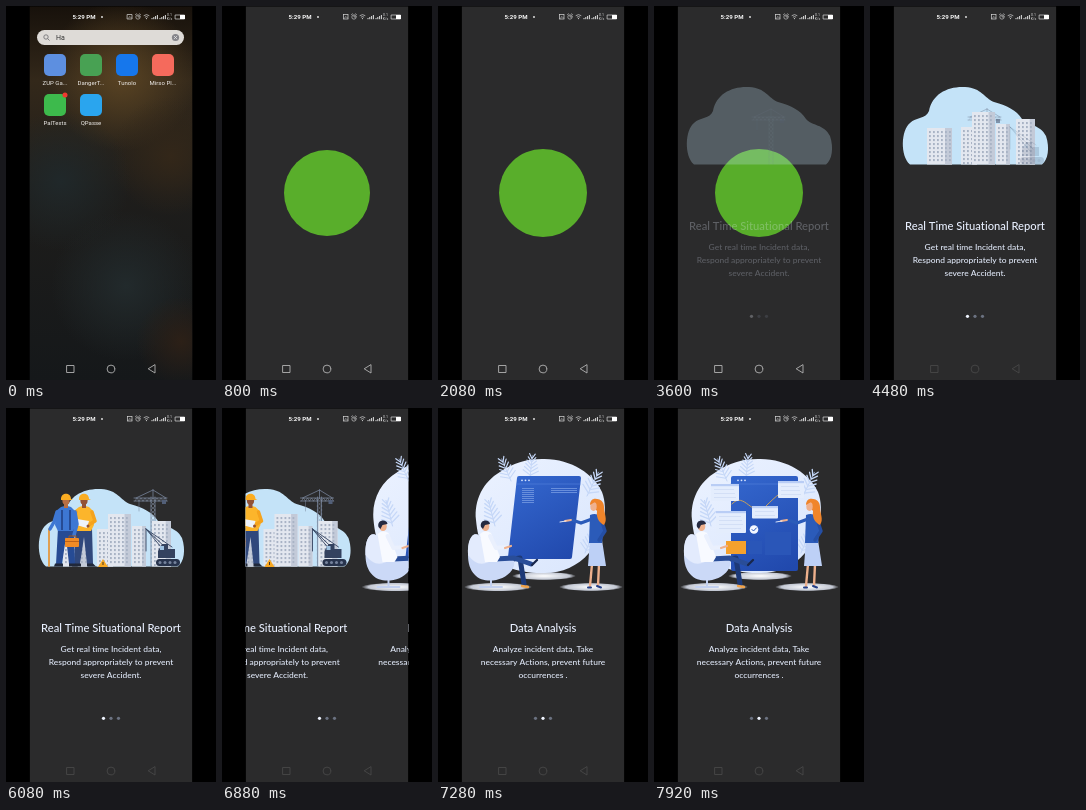
Write an HTML page with a canvas that moves like this. It is 210 px wide and 374 px high and loops after 8000 ms.

```html
<!DOCTYPE html>
<html lang="en">
<head>
<meta charset="utf-8">
<title>App onboarding</title>
<style>
html, body { margin: 0; width: 100%; height: 100%; overflow: hidden; background: #000; }
canvas { display: block; width: 210px; height: 374px; }
</style>
</head>
<body>
<canvas id="stage"></canvas>
<script>
const W = 210, H = 374, LOOP = 8000;
const LEFT = 23.5, WIDTH = 163, DARK = '#2b2b2c';
const canvas = document.getElementById('stage');
const c = canvas.getContext('2d');
const ratio = window.devicePixelRatio || 1;
canvas.width = W * ratio;
canvas.height = H * ratio;
c.letterSpacing = '0.01px'; // keeps letter pairs unjoined

const clamp = v => Math.max(0, Math.min(1, v));
const ramp = (t, a, b) => clamp((t - a) / (b - a));
const smooth = v => v * v * (3 - 2 * v);
const easeOut = v => 1 - Math.pow(1 - v, 3);
const mix = (a, b, v) => a + (b - a) * v;

// Eased value through [time, value] pairs
function track(t, ...keys) {
  if (t <= keys[0][0]) return keys[0][1];
  for (let i = 1; i < keys.length; i++) {
    const [t0, v0] = keys[i - 1], [t1, v1] = keys[i];
    if (t <= t1) return mix(v0, v1, smooth(ramp(t, t0, t1)));
  }
  return keys[keys.length - 1][1];
}

function rect(x, y, w, h, fill) { c.fillStyle = fill; c.fillRect(x, y, w, h); }
function round(x, y, w, h, r, fill) {
  c.beginPath(); c.roundRect(x, y, w, h, r); c.fillStyle = fill; c.fill();
}
function oval(x, y, rx, ry, fill, turn = 0) {
  c.beginPath(); c.ellipse(x, y, rx, ry, turn, 0, 7); c.fillStyle = fill; c.fill();
}
function shape(d, fill) { c.fillStyle = fill; c.fill(new Path2D(d)); }
function line(d, color, width = 1) {
  c.strokeStyle = color; c.lineWidth = width; c.lineCap = c.lineJoin = 'round';
  c.stroke(new Path2D(d));
}
function label(s, x, y, font, fill, align = 'center') {
  c.font = font; c.fillStyle = fill; c.textAlign = align; c.fillText(s, x, y);
}
function layer(alpha, draw, dx = 0, dy = 0) {
  if (alpha <= 0) return;
  c.save();
  c.globalAlpha *= alpha;
  c.translate(dx, dy);
  draw();
  c.restore();
}

function glow(x, y, r, color) {
  const g = c.createRadialGradient(x, y, 0, x, y, r);
  g.addColorStop(0, color + 'ff');
  g.addColorStop(1, color + '00');
  rect(LEFT, 0, WIDTH, H, g);
}

function drawer() {
  const g = c.createLinearGradient(0, 0, 0, H);
  g.addColorStop(0, '#17110b');
  g.addColorStop(.2, '#33281a');
  g.addColorStop(.5, '#1e1d1b');
  g.addColorStop(1, '#15181a');
  rect(LEFT, 0, WIDTH, H, g);
  glow(115, 70, 75, '#594323');
  glow(165, 150, 60, '#332719');
  glow(55, 175, 70, '#20282a');
  glow(120, 280, 75, '#222a2c');
  glow(175, 335, 45, '#2c2017');

  round(31, 24, 147, 15, 7.5, '#dedbd7');
  c.beginPath(); c.arc(40, 31, 2.2, 0, 7);
  c.strokeStyle = '#77777a'; c.lineWidth = .9; c.stroke();
  line('M41.7 32.7L43.3 34.3', '#77777a', .9);
  label('Ha', 50, 33.8, '7px Roboto, sans-serif', '#333', 'left');
  oval(169.5, 31.5, 3.6, 3.6, '#85858a');
  line('M168.2 30.2L170.8 32.8M170.8 30.2L168.2 32.8', '#eee', .7);

  const apps = [
    ['ZUP Ga...', '#5d8fe0'], ['DangerT...', '#48a153'], ['Tunolo', '#1677ec'],
    ['Mirso Pl...', '#f56a5c'], ['PalTexts', '#3dba4c'], ['QPasse', '#2aa5ee']
  ];
  apps.forEach(([name, color], i) => {
    const x = 49 + i % 4 * 36, y = 48 + Math.floor(i / 4) * 40;
    round(x - 11, y, 22, 22, 5, color);
    label(name, x, y + 30.5, '6px Roboto, sans-serif', '#f2f0ee');
  });
  oval(59, 89, 2.5, 2.5, '#f0392f');
}

function badge(t) {
  const r = mix(43, 44, smooth(ramp(t, 1360, 1600)));
  oval(105, 187, r, r, '#59ae2b');
}

function splash(t) {
  const p = easeOut(ramp(t, 480, 760));
  if (p <= 0) return;
  const x = mix(74, LEFT, p), y = mix(48, 0, p);
  const w = mix(22, WIDTH, p), h = mix(22, H, p), s = w / WIDTH;
  c.save();
  c.beginPath(); c.roundRect(x, y, w, h, 6 * (1 - p)); c.clip();
  rect(x, y, w, h, DARK);
  c.translate(x + w / 2, y + h / 2);
  c.scale(s, s);
  c.translate(-105, -187);
  layer(1 - ramp(t, 3600, 3840), () => badge(t));
  c.restore();
}

function copy(title, lines) {
  label(title, 105, 224, '500 11.2px Lato, sans-serif', '#e9f0ff');
  lines.forEach((s, i) =>
    label(s, 105, 244.3 + i * 12.6, '500 8.45px Lato, sans-serif', '#e2eafa'));
}

function tower(x, y, w, h) {
  rect(x, y, w, h, '#e3e7ef');
  rect(x + w * .72, y, w * .28, h, '#c3cad8');
  for (let a = x + 2; a < x + w - 2; a += 4)
    for (let b = y + 3; b < y + h - 2; b += 4) rect(a, b, 1.8, 2.1, '#a9b3c5');
}

function towerCrane() {
  line('M-2 78V7M2 78V7M-19 8H14M-19 11H14M0 0L-17 8M0 0L13 8M0 0V8', '#77839a', .8);
  let d = '';
  for (let y = 12; y < 76; y += 4) d += `M-2 ${y}L2 ${y + 4}M2 ${y}L-2 ${y + 4}`;
  for (let x = -18; x < 13; x += 4) d += `M${x} 11L${x + 2} 8L${x + 4} 11`;
  line(d, '#8b96aa', .5);
  line('M-14 11V21', '#77839a', .5);
  rect(9, 10, 4, 4, '#525f78');
}

function crawler() {
  line('M160 145L140 121M163 143L140 121M140 121V143M166 139L140 121', '#34425f', .9);
  shape('M152 143L156 136H162V141H169V150H152Z', '#34425f');
  rect(154, 138, 4, 4, '#9fc2e2');
  round(150, 151, 24, 7, 3.5, '#27334c');
  for (let x = 154; x < 172; x += 5) oval(x, 154.5, 1.5, 1.5, '#74829c');
}

function person(shirt, pants, skin) {
  shape('M-8 120H8L9 156H3L0 129L-4 156H-10Z', pants);
  shape('M-11 155.5H-3V158.5H-12ZM3 155.5H9L12 158.5H3Z', '#20283a');
  shape('M-5 99Q0 97 5 99L9 103L10 117L7 123H-8L-11 117L-10 103Z', shirt);
  rect(-2, 95, 4, 5, skin);
  oval(0, 92.5, 3.6, 4.4, skin);
  shape('M-5 91C-5 84 5 84 5 91L7 92H-5Z', '#fbad22');
}

function toolMan() {
  line('M-17 121V158', '#e69334', 1.7);
  person('#3d77d3', '#264b94', '#b96f44');
  rect(-5, 102, 2, 20, '#264b94');
  rect(3, 102, 2, 20, '#264b94');
  line('M-9 104L-12 114L-16 121', '#3d77d3', 3.5);
  line('M9 104L11 116L8 127', '#3d77d3', 3.5);
  line('M3 131V128H10V131', '#9b561c', 1);
  round(-1, 130, 14, 9, 1, '#f18b25');
  rect(-1, 133, 14, 1, '#bd6219');
}

function clipMan() {
  person('#fcb52b', '#30487c', '#925236');
  line('M-8 104L-11 114L-3 117', '#f5a31d', 3.5);
  line('M8 104L11 113L3 118', '#f5a31d', 3.5);
  shape('M-7 111L5 113L3 120L-8 117Z', '#eef3fb');
  oval(4, 118, 1.5, 1.5, '#925236');
}

function siteScene(t) {
  shape('M40 158.5C30 150 31 124 40 117C46 111 56 113 59 105C62 88 78 80 95 81' +
    'C112 82 114 92 124 96C138 100 146 104 152 113C158 120 170 118 176 130' +
    'C180 142 178 154 172 158.5Z', '#c4e3f8');
  const move = smooth(ramp(t, 5440, 6050));
  const grow = smooth(ramp(t, 3820, 4400));
  c.save();
  c.beginPath(); c.rect(LEFT, 70, WIDTH, 88.5); c.clip();
  layer(mix(.6, 1, move), towerCrane, mix(117, 147, move), mix(103, 82, move));
  if (grow > 0) {
    c.translate(0, 55 * (1 - grow));
    tower(57, 122, 25, 37);
    tower(91, 121, 16, 38);
    tower(102, 106, 23, 53);
    tower(126, 118, 14, 41);
    tower(146, 113, 19, 46);
  }
  c.restore();
  layer(ramp(t, 4400, 4880), crawler);
  layer(ramp(t, 5760, 6000), () => {
    shape('M97 151L102 159H92Z', '#f7a823');
    rect(96.5, 154, 1, 3, '#473620');
  });
  layer(t > 4480 ? 1 : 0, clipMan, track(t, [4480, 8], [5200, 95], [5440, 95], [6000, 78]));
  layer(t > 5120 ? 1 : 0, toolMan, track(t, [5120, 2], [5440, 28], [6000, 60]));
}

function leaf(x, y, turn, size) {
  c.save();
  c.translate(x, y); c.rotate(turn); c.scale(size, size);
  line('M0 0V-24', '#b3c9f2', .6);
  for (let i = 0; i < 6; i++) {
    const a = -3 - i * 3.5, w = 8 - i;
    line(`M0 ${a}L${-w} ${a - 5}M0 ${a}L${w} ${a - 5}`, '#c6d8f8', 1.2);
  }
  c.restore();
}

function shadow(x, y, rx) {
  c.save();
  c.translate(x, y); c.scale(1, .13);
  const g = c.createRadialGradient(0, 0, 0, 0, 0, rx);
  g.addColorStop(0, '#ffffff');
  g.addColorStop(.8, '#e9effdcc');
  g.addColorStop(1, '#e9effd00');
  oval(0, 0, rx, rx, g);
  c.restore();
}

function card(x, y, w, h) {
  round(x, y, w, h, 1, '#e4edfd');
  rect(x, y, w, 2.2, '#b9cdf5');
  for (let b = y + 5; b < y + h - 2; b += 4) rect(x + 3, b, w - 8 + b % 3, .8, '#d0ddf6');
}

function board(t) {
  const p = smooth(ramp(t, 7520, 7840));
  const skew = mix(9, 0, p);
  const l = mix(70, 77, p), r = mix(134, 144, p), b = mix(151, 163, p);
  const g = c.createLinearGradient(80, 66, 130, b);
  g.addColorStop(0, '#3467ce');
  g.addColorStop(1, '#2149ad');
  shape(`M${l + skew} 70Q${l + skew} 68 ${l + skew + 2} 68H${r + skew - 2}` +
    `Q${r + skew} 68 ${r + skew} 70L${r} ${b - 2}Q${r} ${b} ${r - 2} ${b}H${l + 2}` +
    `Q${l} ${b} ${l} ${b - 2}Z`, g);
  line(`M${l + skew} 76H${r + skew - 1}`, '#4f7cd8', .7);
  for (let i = 0; i < 3; i++) oval(84 + i * 3.5, 72.3, .9, .9, '#d6e4ff');
  layer(1 - p, () => {
    for (let y = 80; y < 96; y += 2) {
      rect(84, y, 12, .9, '#6f95df');
      if (y < 86) rect(113, y, 26, .9, '#6f95df');
    }
  });
  layer(p, () => {
    rect(72, 133, 20, 13, '#f5a12d');
    rect(94, 133, 14, 13, '#2a56b8');
    rect(111, 124, 26, 23, '#2a56b8');
    line('M78 96C90 82 99 111 111 99S128 83 140 78', '#d9a850', .9);
    const rise = 5 * (1 - p);
    card(57, 76 + rise, 28, 17);
    card(62, 103 + rise, 30, 22);
    card(98, 98 + rise, 26, 12.5);
    card(124, 73 + rise, 26, 17);
    oval(100, 121.5, 4.3, 4.3, '#f3f7ff');
    line('M98 121.5L99.5 123L102.3 120', '#2856b9', 1);
  });
}

function sittingMan() {
  line('M53 170V178M42 179H64', '#c2d0f0', 2);
  line('M62 153L82 150L86 176', '#1d3977', 5);
  shape('M30 147C29 126 39 121 44 132C48 144 54 149 66 149C78 149 78 156 74 162' +
    'C66 174 45 176 37 167C32 162 30 155 30 147Z', '#cbd9f7');
  shape('M30 147C29 126 39 121 44 132C47 142 51 148 57 150C47 158 38 158 30 147Z', '#e3ebfd');
  line('M57 151L76 150L93 156', '#294d98', 5);
  line('M84 178L90 179', '#f1a34a', 2.3);
  line('M94 157L99 152', '#19274c', 2.3);
  shape('M42 126Q47 121 53 125L62 149L59 154H47Z', '#f8faff');
  line('M52 128L58 140L68 139', '#eaf0fd', 4);
  line('M67 140L73 138', '#efb18e', 2.2);
  oval(47.5, 118.5, 3.8, 4.6, '#efb18e');
  shape('M43 119C41 111 52 111 52 116L47 117L45 121Z', '#252a41');
}

function woman() {
  line('M154 156L152 178M161 156L160 178', '#eeb08c', 2.4);
  line('M150 179.5H153M159 178L163 179.5', '#233e87', 2);
  shape('M152 132H164L168 158H150Z', '#bdd0f6');
  shape('M152 107Q158 104 165 109L166 121L164 135H151Z', '#2b5bb9');
  line('M163 111L167 123L161 132', '#254fa5', 3.4);
  shape('M153 96C155 88 166 90 166 99C166 106 170 111 166 117C162 115 158 111 159 103Z', '#f0852b');
  oval(155.5, 98.5, 3.2, 4.4, '#efb18e');
  shape('M152 97C152 88 163 89 163 98L157 94Z', '#f0852b');
  line('M154 111L143 115L134 112', '#2b5bb9', 3.4);
  line('M133 112L127 113', '#efb18e', 1.8);
  line('M128 113L122 114', '#f0f4ff', .9);
}

function dataScene(t) {
  shadow(60, 179, 34);
  shadow(106, 168, 32);
  shadow(153, 179, 32);
  const g = c.createLinearGradient(50, 60, 140, 165);
  g.addColorStop(0, '#eaf1ff');
  g.addColorStop(1, '#dbe7fd');
  shape('M38 112C36 92 45 74 62 64C75 55 88 51 104 51C132 50 156 66 164 84' +
    'C171 102 165 130 151 145C139 159 122 166 103 165C80 165 56 157 47 143' +
    'C41 133 39 123 38 112Z', g);
  leaf(73, 73, -.4, 1);
  leaf(92, 70, .1, .95);
  leaf(149, 88, .45, 1.1);
  leaf(57, 118, -.25, 1.1);
  leaf(147, 145, .4, 1);
  board(t);
  sittingMan();
  woman();
}

function pages(t) {
  const swipe = smooth(ramp(t, 6720, 7160));
  layer(ramp(t, 3520, 3820), () => {
    if (swipe < 1) layer(1, () => {
      siteScene(t);
      copy('Real Time Situational Report',
        ['Get real time Incident data,', 'Respond appropriately to prevent', 'severe Accident.']);
    }, -WIDTH * swipe);
    if (swipe > 0) layer(1, () => {
      dataScene(t);
      copy('Data Analysis',
        ['Analyze incident data, Take', 'necessary Actions, prevent future', 'occurrences .']);
    }, WIDTH * (1 - swipe));
    const active = swipe < .5 ? 0 : 1;
    for (let i = 0; i < 3; i++)
      oval(97.5 + i * 7.5, 310.3, 1.6, 1.6, i === active ? '#eff4ff' : '#6b7281');
  });
}

function statusBar() {
  label('5:29 PM', 66.5, 13, 'bold 6.1px Roboto, sans-serif', '#f5f5f5', 'left');
  oval(96, 11, .9, .9, '#eee');
  c.strokeStyle = '#d8d8d8';
  c.lineWidth = .7;
  c.strokeRect(121.5, 8.5, 4.5, 4.5);
  line('M122.5 12L124 10.5L125.5 12', '#d8d8d8', .6);
  c.beginPath(); c.arc(132, 11, 2.2, 0, 7); c.stroke();
  line('M132 9.5V11H133.2M129.5 8.5L130.5 7.8M134.5 8.5L133.5 7.8', '#d8d8d8', .6);
  line('M138 9.5Q140.5 7.5 143 9.5M139.2 11Q140.5 10 141.8 11', '#d8d8d8', .7);
  oval(140.5, 12.6, .6, .6, '#d8d8d8');
  for (let i = 0; i < 4; i++) {
    rect(145.5 + i * 1.8, 12 - i, 1, 1.2 + i, '#ddd');
    rect(153.5 + i * 1.8, 12 - i, 1, 1.2 + i, '#ddd');
  }
  label('0.1', 163.5, 10, '3.5px Roboto, sans-serif', '#ddd');
  label('K/s', 163.5, 13.6, '3.5px Roboto, sans-serif', '#ddd');
  c.strokeRect(169.5, 9, 9, 4);
  rect(174, 9, 5, 4, '#fff');
}

function navBar(t) {
  const v = Math.round(mix(178, 72, ramp(t, 3600, 4100)));
  const color = `rgb(${v},${v},${v})`;
  line('M61 359.5H68V366.5H61ZM149 359V367L142.5 363Z', color, .9);
  c.beginPath(); c.arc(105, 363, 3.9, 0, 7); c.stroke();
}

function render(t) {
  c.setTransform(ratio, 0, 0, ratio, 0, 0);
  c.globalAlpha = 1;
  rect(0, 0, W, H, '#000');
  c.save();
  c.beginPath(); c.rect(LEFT, .5, WIDTH, H); c.clip();
  if (t < 760) drawer();
  splash(t);
  pages(t);
  statusBar();
  navBar(t);
  c.restore();
}

const start = performance.now();
function frame() {
  render((performance.now() - start) % LOOP);
  requestAnimationFrame(frame);
}
frame();
</script>
</body>
</html>
```
